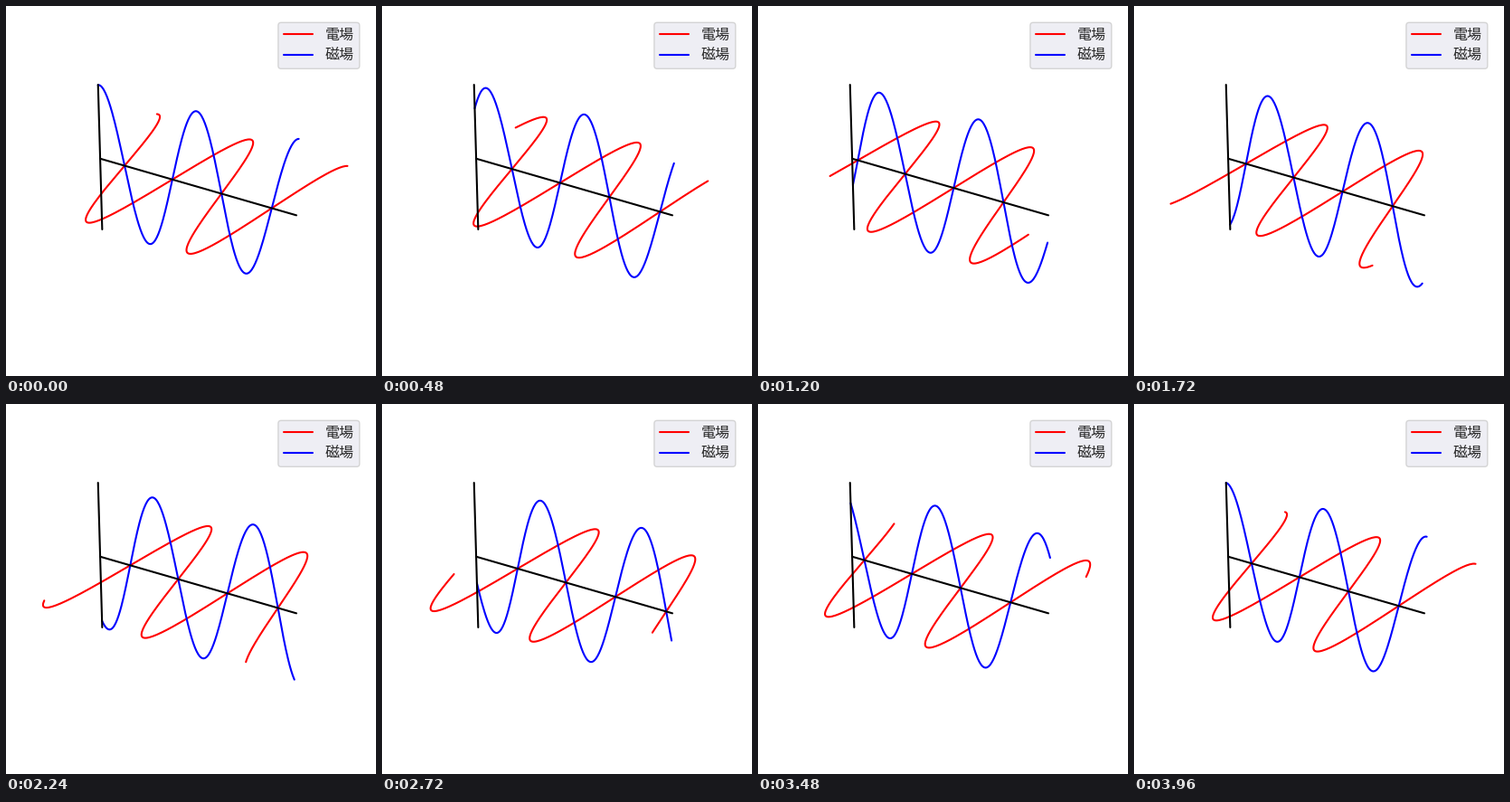
Write a matplotlib script that moves like this. It is 409x409 px and loops after 4 s.

```python
import numpy as np
import matplotlib.pyplot as plt
from matplotlib.animation import FuncAnimation
from matplotlib.patches import FancyBboxPatch

SIZE, DPI = 409, 100
PAD = 10
FRAMES, INTERVAL = 100, 40
WAVES = 2
FONT_PX = 16
STROKE = dict(lw=1.5, solid_capstyle="round")

fig = plt.figure(figsize=(SIZE / DPI, SIZE / DPI), dpi=DPI, facecolor="white")

# 3D scene with the default camera
inset, side = PAD / SIZE, 1 - 2 * PAD / SIZE
ax = fig.add_axes([inset, inset, side, side], projection="3d")
ax.set_axis_off()
ax.set(xlim=(0, WAVES), ylim=(-1, 1), zlim=(-1, 1))

x = np.linspace(0, WAVES, 241)
zero = np.zeros_like(x)
electric, = ax.plot(x, zero, zero, color="red", **STROKE)
magnetic, = ax.plot(x, zero, zero, color="blue", **STROKE)
ax.plot([0, WAVES], [0, 0], [0, 0], color="black", **STROKE)
ax.plot([0, 0], [0, 0], [-1, 1], color="black", **STROKE)

# Legend, laid out in pixels from the top left
key = fig.add_axes([0, 0, 1, 1])
key.set(xlim=(0, SIZE), ylim=(SIZE, 0))
key.set_axis_off()
key.add_patch(FancyBboxPatch(
    (300.9, 18.3), 89.9, 51, boxstyle="round,pad=0,rounding_size=3.2",
    facecolor="#EAEAF2", edgecolor="0.8", lw=1, alpha=0.8))


def add_entry(y, label, color):
    key.plot([307.4, 339.2], [y, y], color=color, **STROKE)
    key.text(352.4, y + 6.1, label, color="0.15", va="baseline", ha="left",
             family="Noto Sans CJK JP", weight="light",
             fontsize=FONT_PX * 72 / DPI)


add_entry(30.5, "電場", "red")
add_entry(54, "磁場", "blue")


def update(i):
    wave = np.cos(2 * np.pi * (x - (i + 1) / FRAMES))
    electric.set_data_3d(x, wave, zero)
    magnetic.set_data_3d(x, zero, wave)
    return electric, magnetic


anim = FuncAnimation(fig, update, frames=FRAMES, interval=INTERVAL,
                     repeat=True, repeat_delay=0, blit=False)
plt.show()
```
